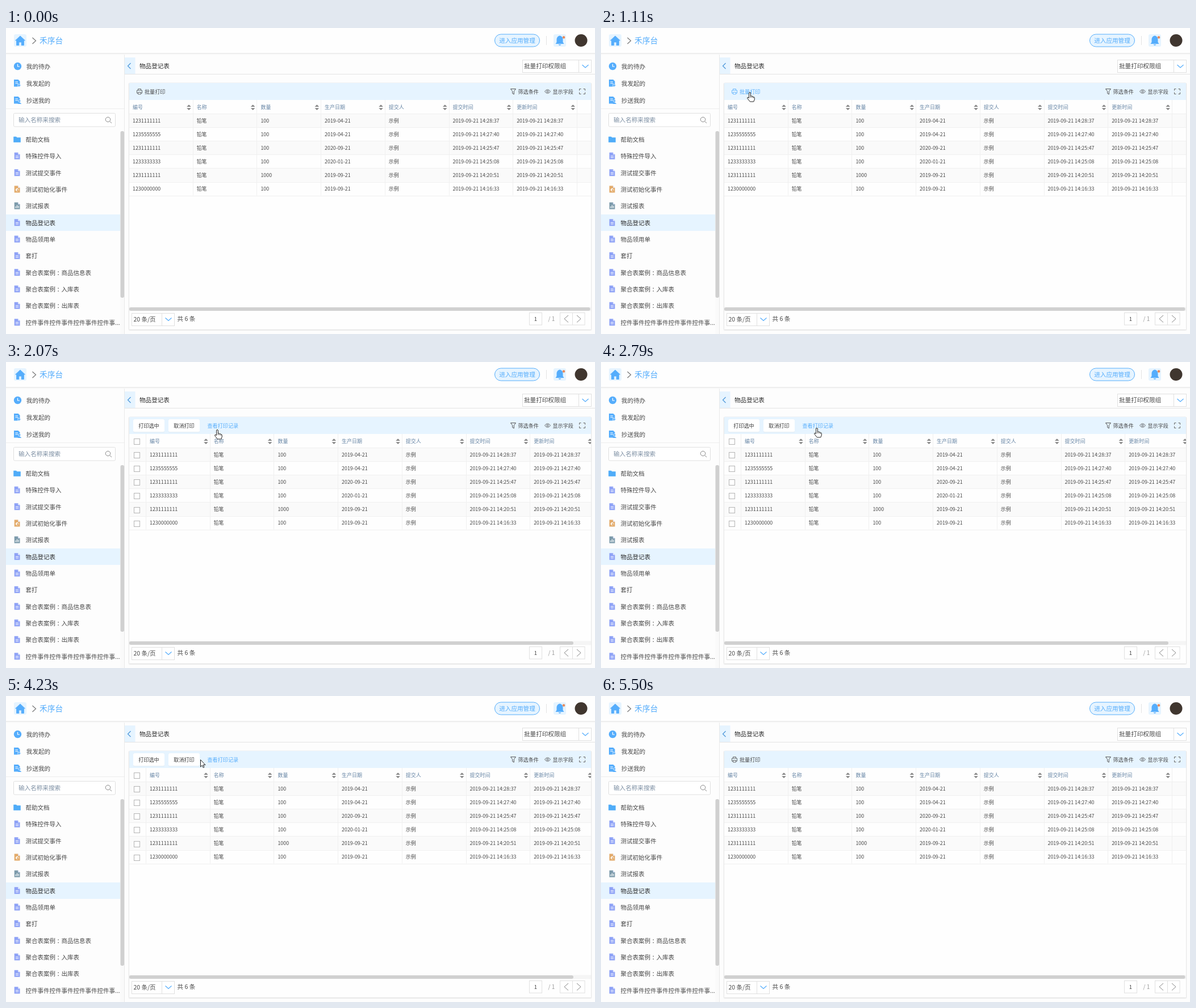
Write an HTML page that moves like this. It is 1037 px wide and 540 px high and loops after 5.91 s.

```html
<!DOCTYPE html>
<html lang="zh-CN">
<head>
<meta charset="utf-8">
<title>物品登记表</title>
<style>
html, body { margin: 0; width: 100%; height: 100%; overflow: hidden; background: #fdfdfd; }
svg { display: block; width: 100%; height: 100%; }
text { font-family: "Noto Sans CJK SC", "Noto Sans CJK", sans-serif; white-space: pre; }
</style>
</head>
<body>
<svg id="stage" viewBox="0 0 1037 540"></svg>
<script>
const BLUE = '#55adfc', PALE = '#e6f4ff', INK = '#484848', LINE = '#e0e0e0', GREY = '#d0d0d0';
const LOOP = 5910, STEP = 80, START = 230, END = 5500;
const PRINT_ON = 1190, PRINT_OFF = 4550;

// x, vertical centre, size, string
const label = (x, y, size, str, fill = INK, extra = '') =>
  `<text x="${x}" y="${y + size * 0.37}" font-size="${size}" fill="${fill}" ${extra}>${str}</text>`;
const rect = (x, y, w, h, fill, extra = '') =>
  `<rect x="${x}" y="${y}" width="${w}" height="${h}" fill="${fill}" ${extra}/>`;
const path = (d, fill, extra = '') => `<path d="${d}" fill="${fill}" ${extra}/>`;
const line = (d, stroke, width = 1, extra = '') =>
  `<path d="${d}" fill="none" stroke="${stroke}" stroke-width="${width}" ${extra}/>`;
const circle = (x, y, r, fill, extra = '') => `<circle cx="${x}" cy="${y}" r="${r}" fill="${fill}" ${extra}/>`;
const at = (x, y, body, id = '') => `<g ${id && `id="${id}"`} transform="translate(${x} ${y})">${body}</g>`;
const frame = (x, y, w, h, stroke = LINE, rx = 0) => rect(x, y, w, h, '#fff', `stroke="${stroke}" rx="${rx}"`);
// Full-width colon set in the middle of its cell
const colon = s => s.replace('：', '<tspan dx="2.6">：</tspan><tspan dx="-2.6">') + (s.includes('：') ? '</tspan>' : '');
const CENTER = 'text-anchor="middle"';

function header() {
  return rect(0, 0, 1037, 44, '#fefefe') +
    rect(0, 44, 1037, 1, '#ebebeb') + rect(0, 45, 1037, 1, '#f1f1f1') + rect(0, 46, 1037, 1, '#f8f8f8') +
    rect(14, 11, 22, 22, PALE, 'rx="3"') +
    path('M25 14L33.5 22H31.5V30.5H27.2V25H22.8V30.5H18.5V22H16.5Z', BLUE, 'stroke="#55adfc" stroke-width=".8" stroke-linejoin="round"') +
    line('M46.5 17L52.5 22.5L46.5 28', '#777', 1.2) +
    label(59, 22, 13.7, '禾序台', BLUE) +
    rect(860.5, 11, 79, 22, PALE, `rx="11" stroke="${BLUE}"`) +
    label(900, 22, 10.6, '进入应用管理', BLUE, CENTER) +
    line('M951.5 14V30', '#e3e3e3') +
    rect(964, 11, 22, 22, PALE, 'rx="3"') +
    path('M975 13.5C979 14.5 980.5 17 980.5 21V25L982.5 28H967.5L969.5 25V21C969.5 17 971 14.5 975 13.5ZM972.5 29H977.5Q975 32.5 972.5 29Z', BLUE) +
    circle(982, 16.5, 2.3, '#e88a5c') +
    circle(1012.5, 22, 11, '#40362f');
}

const doc = (color, mark = '') =>
  path('M-4.8 -6H1.6L5 -2.6V6H-4.8Z', color) + path('M1.6 -6V-2.6H5Z', '#e4e9ff') +
  (mark || line('M-2.6 .2H2.8M-2.6 2.8H2.8', '#fff', 1));
const folder = path('M-6 -4.5H-1.5L0 -3H6V5H-6Z', '#4facf8', 'stroke="#4facf8" stroke-width=".6" stroke-linejoin="round"');

const MENU = ['帮助文档', '特殊控件导入', '测试提交事件', '测试初始化事件', '测试报表', '物品登记表', '物品领用单',
  '套打', '聚合表案例：商品信息表', '聚合表案例：入库表', '聚合表案例：出库表', '控件事件控件事件控件事件控件事...'];

function menuIcon(i) {
  if (i === 0) return folder;
  if (i === 3) return doc('#e3ab6b', circle(.2, 1, 2.6, '#fff') + circle(.8, 1.4, 1.5, '#dda35f'));
  if (i === 4) return doc('#7d9bab', line('M-2.4 4V1M0 4V-1M2.4 4V0', '#fff', 1.2));
  return doc('#8ea2f6');
}

function sidebar() {
  const page = path('M-6 -6.5H1.5L4.5 -3.5V6H-6Z', BLUE) + line('M-3.6 -2.5H1M-3.6 .2H1', '#fff', 1);
  const top = circle(20.5, 67.5, 6.7, BLUE) + line('M20.5 63.5V68H24', '#fff', 1.2) +
    at(20, 97.5, page + path('M1 1L7 3.6L1 6.5Z', BLUE, 'stroke="#fff" stroke-width=".7"')) +
    at(20, 127.5, page + circle(3.8, 1.3, 2, BLUE, 'stroke="#fff" stroke-width=".7"') +
      path('M.3 6.6Q3.8 1.2 7.3 6.6Z', BLUE)) +
    ['我的待办', '我发起的', '抄送我的'].map((s, i) => label(35.8, 68.4 + 30 * i, 10.6, s)).join('');
  const items = MENU.map((s, i) => {
    const y = 197 + 29.33 * i;
    return at(19.5, y - .5, menuIcon(i)) + label(34.5, y, 10.5, colon(s), i === 5 ? '#2c2c2c' : INK);
  }).join('');
  return top + line('M0 142.5H208', '#ededed') +
    frame(13.5, 150.5, 179, 23.5, LINE, 2) + label(22, 162.5, 10.6, '输入名称来搜索', '#7d8fa3') +
    circle(179.5, 161.5, 4.2, 'none', 'stroke="#888"') + line('M182.6 164.6L186 168', '#888') +
    rect(0, 329, 201, 29, PALE) + items +
    rect(201, 182, 7, 358, '#fafafa') + rect(201.5, 182, 6.5, 294, GREY, 'rx="3"') +
    line('M208.5 47V540', '#e9e9e9');
}

function titleBar() {
  return rect(209, 52, 18.5, 29.5, PALE) + line('M209 81.5H1037', '#e4e4e4') +
    line('M219.5 62L214.5 67L219.5 72', '#4b96da', 1.2) +
    label(235, 67, 10.6, '物品登记表', '#2c2c2c') +
    frame(909.5, 56.5, 121, 22) + line('M1008.5 57V78', LINE) +
    label(912, 67.5, 10.6, '批量打印权限组') + line('M1014.5 65L1020 70L1025.5 65', BLUE, 1.2);
}

function toolbar() {
  const button = (x, s) => rect(x, 101, 55, 23.3, '#000', 'rx="2.5" opacity=".07"') +
    rect(x, 101, 55, 22.5, '#fff', 'rx="2.5"') + label(x + 27.5, 112.5, 9.1, s, '#3a3a3a', CENTER);
  const printer = 'M232.5 110V107.5H237.5V110M232.5 115H230.5V110H239.5V115H237.5M232.5 113.5H237.5V116.8H232.5Z';
  return rect(217, 97, 813, 30, PALE) +
    `<g id="batch" fill="${INK}" stroke="${INK}"><path d="${printer}" fill="none" stroke-width=".8"/>` +
    '<text x="244" y="115.8" font-size="9.1" stroke="none">批量打印</text></g>' +
    '<g id="actions">' + button(224, '打印选中') + button(286, '取消打印') +
    label(354.5, 112.5, 9.1, '查看打印记录', BLUE) + '</g>' +
    line('M888.5 107.5H897.5L894.3 111.8V117L891.7 115.5V111.8Z', '#555') + label(901.5, 112.5, 9.1, '筛选条件') +
    line('M948.5 112Q953.5 105.5 958.5 112Q953.5 118.5 948.5 112Z', '#555', .9) +
    circle(953.5, 112, 1.5, 'none', 'stroke="#555" stroke-width=".9"') + label(962.5, 112.5, 9.1, '显示字段') +
    line('M1009.5 110.5V107.5H1012.5M1016.5 107.5H1019.5V110.5M1019.5 113.5V116.5H1016.5M1012.5 116.5H1009.5V113.5', '#666');
}

const HEADS = ['编号', '名称', '数量', '生产日期', '提交人', '提交时间', '更新时间'];
const ROWS = [
  ['1231111111', 100, '2019-04-21', '14:28:37'],
  ['1235555555', 100, '2019-04-21', '14:27:40'],
  ['1231111111', 100, '2020-09-21', '14:25:47'],
  ['1233333333', 100, '2020-01-21', '14:25:08'],
  ['1231111111', 1000, '2019-09-21', '14:20:51'],
  ['1230000000', 100, '2019-09-21', '14:16:33'],
];
const COL = 112.7, ROW = 24.1, TOP = 151;

function table() {
  let stripes = '', grid = '', checks = '', cells = '';
  for (let i = 0; i < 6; i++) {
    const y = TOP + ROW * i;
    if (i % 2 === 0) stripes += rect(217, y, 813, ROW, '#fafafa');
    const [code, count, made, clock] = ROWS[i], stamp = '2019-09-21 ' + clock;
    [code, '铅笔', count, made, '示例', stamp, stamp].forEach((s, c) => {
      cells += label(223 + COL * c, y + 12.6, 8.9, s);
    });
  }
  for (let i = 0; i < 7; i++) {
    const y = Math.round(TOP + ROW * i) + .5;
    stripes += line(`M217 ${y}H1030`, '#f0f0f0');
    checks += frame(225.5, Math.round(136 + ROW * i) - .5, 10, 10, '#b5b5b5');
    const x = Math.round(217 + COL * (i + 1)) - .5, s = 322 + COL * i;
    grid += line(`M${x} 127V295.5`, '#f0f0f0');
    cells += label(223 + COL * i, 139.5, 9, HEADS[i], '#6685a5') +
      path(`M${s - 3.8} 139L${s} 135.2L${s + 3.8} 139ZM${s - 3.8} 141.2H${s + 3.8}L${s} 145Z`, '#858585');
  }
  return '<clipPath id="card"><rect x="217" y="127" width="813" height="400"/></clipPath>' +
    `<g clip-path="url(#card)">${stripes}<g id="checks">${checks}${line('M246.5 127V295.5', '#f0f0f0')}</g>` +
    `<g id="columns">${grid}${cells}</g></g>`;
}

function footer() {
  return rect(217, 492.5, 813, 7, '#f5f5f5') +
    `<rect id="thumb" x="217" y="493" height="6" rx="3" fill="${GREY}"/>` +
    frame(221.5, 503.5, 75, 22) + line('M274.5 504V525', LINE) +
    label(224.5, 514.5, 10.5, '20 条/页') + line('M280.5 511.5L286 516.5L291.5 511.5', BLUE, 1.2) +
    label(301.5, 513.5, 10.6, '共 6 条') +
    frame(921.5, 502.5, 22, 21.5) + label(932.5, 513.5, 9.6, '1', INK, CENTER) +
    label(954.5, 513.5, 10, '/ 1', '#999') +
    frame(975.5, 502.5, 43.5, 21.5) + line('M997.5 503V524', LINE) +
    line('M990 507L983 513.2L990 519.5M1005 507L1012 513.2L1005 519.5', '#858585');
}

const pointer =
  '<g stroke="#222" fill="#fff" stroke-linejoin="round">' +
  '<path id="arrow" d="M.5 .5V13L3.3 10.3L5.2 14.4L7 13.6L5.2 9.6H9Z"/>' +
  '<g id="hand"><path d="M-1.4 9.5V1a1.4 1.4 0 0 1 2.8 0V6q2.3-.7 2.6.8q2.2-.6 2.4.9q1.9-.2 1.9 1.8V12L6.8 16H.4L-4.2 10.2q-.6-2 1.2-1.8Z"/>' +
  '<path d="M1.4 6V9M4 7V9.3M6.4 8V9.8" fill="none" stroke-width=".8"/></g></g>';

const stage = document.getElementById('stage');
stage.innerHTML = rect(0, 0, 1037, 540, '#fdfdfd') + sidebar() + titleBar() +
  rect(215.5, 96.5, 816, 438, '#f4f4f4', 'rx="2"') + rect(216.3, 96.7, 814.4, 436.6, '#e3e3e3', 'rx="2"') +
  rect(217, 97, 813, 435, '#fefefe') +
  toolbar() + table() + footer() + header() + at(0, 0, pointer, 'pointer');

const el = {};
for (const id of ['batch', 'actions', 'checks', 'columns', 'thumb', 'pointer', 'arrow', 'hand'])
  el[id] = document.getElementById(id);
const show = (node, on) => node.setAttribute('display', on ? 'inline' : 'none');

// time, x, y of the pointer tip
const TRACK = [
  [230, 560, 430], [790, 300, 136], [870, 284, 126], [1110, 262, 114], [1430, 258, 113], [1750, 258, 113],
  [2070, 372, 120], [2390, 384, 117], [2470, 384, 117], [2630, 381, 117], [2710, 381, 117], [2870, 378, 117],
  [2950, 378, 117], [3430, 360, 116], [3510, 360, 116], [3830, 352, 115], [3990, 352, 115], [4230, 342, 112],
  [4390, 316, 113], [4550, 316, 113], [5030, 632, 307], [5110, 662, 338], [5430, 790, 500], [5500, 790, 520],
];

function tip(t) {
  const i = Math.max(1, TRACK.findIndex(k => k[0] >= t));
  const [t0, x0, y0] = TRACK[i - 1], [t1, x1, y1] = TRACK[i];
  const p = (t - t0) / (t1 - t0);
  return [Math.round(x0 + (x1 - x0) * p), Math.round(y0 + (y1 - y0) * p)];
}

function render(t) {
  const printing = t >= PRINT_ON && t < PRINT_OFF;
  const visible = t >= START && t < END;
  const [x, y] = visible ? tip(START + STEP * Math.floor((t - START) / STEP)) : [0, 0];
  const over = (a, b) => visible && x >= a && x <= b && y >= 101 && y <= 123;
  const batchHover = !printing && over(226, 284);
  const active = batchHover || printing && (over(224, 279) || over(286, 341) || over(351, 412));

  show(el.batch, !printing);
  show(el.actions, printing);
  show(el.checks, printing);
  el.columns.setAttribute('transform', `translate(${printing ? 30 : 0} 0)`);
  el.thumb.setAttribute('width', printing ? 782 : 811.5);
  for (const key of ['fill', 'stroke']) el.batch.setAttribute(key, batchHover ? BLUE : INK);
  show(el.pointer, visible);
  show(el.arrow, !active);
  show(el.hand, active);
  el.pointer.setAttribute('transform', `translate(${x} ${y})`);
}

const begin = performance.now();
function tick() {
  render((performance.now() - begin) % LOOP);
  requestAnimationFrame(tick);
}
tick();
</script>
</body>
</html>
```
